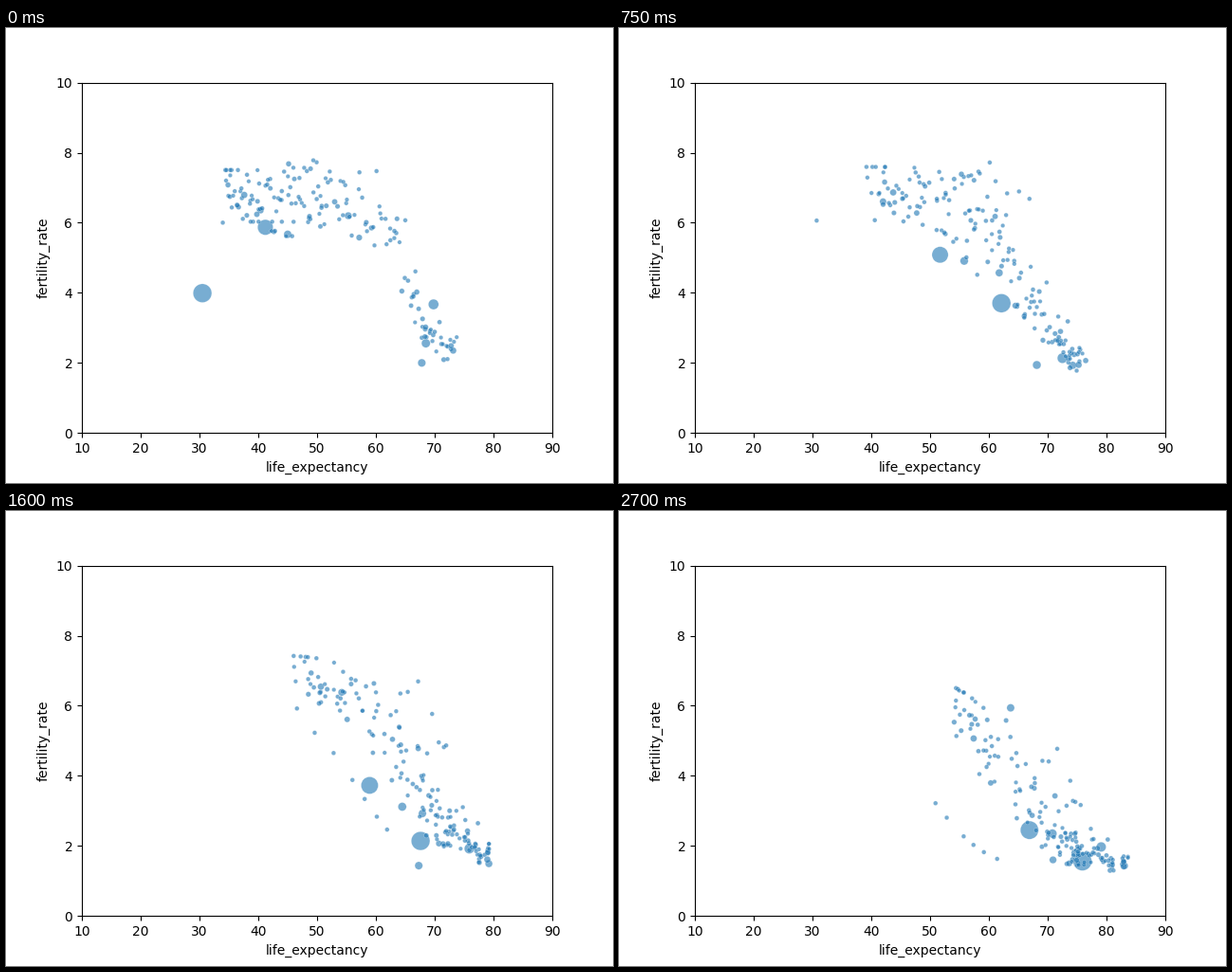
Write a matplotlib script that moves like this. It is 640 px wide and 480 px high and loops after 2750 ms.

```python
import numpy as np
import matplotlib.pyplot as plt
from matplotlib.animation import FuncAnimation

FRAMES = 55
STEPS = np.arange(FRAMES)
T = STEPS / (FRAMES - 1)
rng = np.random.default_rng(7)

# Life expectancy at even ranks, first and last frame
QUARTERS = np.linspace(0, 1, 5)
LIFE_START = (34, 43, 52, 65.5, 73.5)
LIFE_END = (54, 65.5, 73.5, 77, 83.3)

lives, rates, shares = [], [], []


def add(life, rate, share):
    lives.append(life)
    rates.append(rate)
    shares.append(share)


def track(share, life, rate, at=(0, 9, 21, 37, 54)):
    """Add a large dot through a few key points; share is relative to the largest."""
    add(np.interp(STEPS, at, life), np.interp(STEPS, at, rate), np.linspace(*share, FRAMES))


def dip(centre, width, depth):
    """Temporary loss of life expectancy."""
    return -depth * np.exp(-((STEPS - centre) / width) ** 2)


def life_path(first_rank, last_rank):
    """Ease from one rank's starting life to another's final life."""
    a = np.interp(first_rank, QUARTERS, LIFE_START)
    b = np.interp(last_rank, QUARTERS, LIFE_END)
    power = 1 + 3.2 * first_rank * (1 - first_rank)
    return a + (b - a) * (1 - (1 - T) ** power)


def rate_path(life, lag, level):
    """Family size falls along an S-curve that widens with time."""
    high = 6.7 + 0.6 * T - 1.1 * T ** 2
    low = 1.4 + (1 - T) ** 3
    middle = 65 + 1.5 * np.sin(np.pi * T) + lag
    width = 1.8 + 3 * (1 - (1 - T) ** 2.5)
    return level * (low + (high - low) / (1 + np.exp((life - middle) / width)))


def small(first_rank, last_rank, lag=0, level=1, share=0.008, loss=0):
    life = life_path(first_rank, last_rank)
    sway = 0.4 * np.sin(2 * np.pi * (2 * T + rng.random()))
    rate = rate_path(life + sway, lag, level)
    add(life + sway + loss, rate, np.full(FRAMES, share))


# The most populous
track((1, 1), (30.5, 34.5, 51.5, 59.4, 63.5, 66.4, 69.1, 75.9),
      (3.99, 3.28, 7.47, 5.67, 2.72, 2.63, 1.53, 1.56), (0, 1, 3, 9, 18, 28, 37, 54))
track((.675, .95), (41.2, 47.9, 55.5, 60.5, 66.9), (5.87, 5.57, 4.6, 3.33, 2.45))
track((.27, .235), (69.8, 70.7, 74.3, 76.6, 79.1), (3.67, 2.46, 1.81, 1.97, 1.97))
track((.18, .105), (68.5, 68.6, 67.7, 67.1, 70.9), (2.56, 1.99, 1.89, 1.23, 1.6))
track((.14, .093), (67.8, 71.9, 76.6, 80.4, 83.1), (2, 2.1, 1.76, 1.37, 1.43))
track((.13, .187), (45, 52, 59.6, 66.7, 70.8), (5.67, 5.52, 4.3, 2.58, 2.35))
track((.108, .15), (55.3, 59.3, 64.2, 69.6, 74.7), (6.2, 5.17, 3.97, 2.45, 1.8))
track((.068, .13), (40.4, 31.6, 52.4, 55, 63.7), (6.35, 6.43, 6.78, 6.2, 5.94))

# Wars, a genocide and an earthquake
small(0.15, 0.3, level=0.9, loss=dip(17, 3, 30))
small(0.12, 0.22, level=1.1, loss=dip(34, 1, 42))
small(0.1, 0.15, loss=dip(30, 1.5, 17))
small(0.25, 0.22, lag=-3, loss=dip(50, 0.6, 32))

# An epidemic late in the loop
for rank in np.linspace(0.12, 0.4, 6):
    small(rank, rank, lag=-6, level=0.9, loss=dip(46, 12, 14))

# Long lives that keep large families
for rank in np.linspace(0.35, 0.65, 7):
    small(rank, rank, lag=rng.uniform(4, 8), level=rng.uniform(1.05, 1.18))

# Short lives that keep large families
for rank in np.linspace(0, 0.06, 5):
    small(rank, rank, lag=1, level=1.12)

# Everyone else, spread evenly over the ranks
COUNT = 148
for rank in (np.arange(COUNT) + 0.5) / COUNT:
    mood = np.clip(rng.normal(size=3), -1.9, 1.9)
    small(rank, np.clip(rank + 0.08 * mood[0], 0, 1),
          lag=mood[1] * (0.8 + 1.8 * T), level=1 + 0.085 * mood[2],
          share=min(0.08, rng.lognormal(np.log(0.008), 1.1)))

X, Y = np.array(lives), np.array(rates)
SIZE = 10 + 190 * np.array(shares)

fig, ax = plt.subplots(figsize=(6.4, 4.8), dpi=100)
dots = ax.scatter(X[:, 0], Y[:, 0], s=SIZE[:, 0], color="#1f77b4",
                  alpha=0.6, edgecolors="white", linewidths=0.25)
ax.set(xlim=(10, 90), ylim=(0, 10), xlabel="life_expectancy", ylabel="fertility_rate")


def draw(i):
    dots.set_offsets(np.column_stack((X[:, i], Y[:, i])))
    dots.set_sizes(SIZE[:, i])
    return (dots,)


anim = FuncAnimation(fig, draw, frames=FRAMES, interval=50, repeat=True, repeat_delay=0)
plt.show()
```
